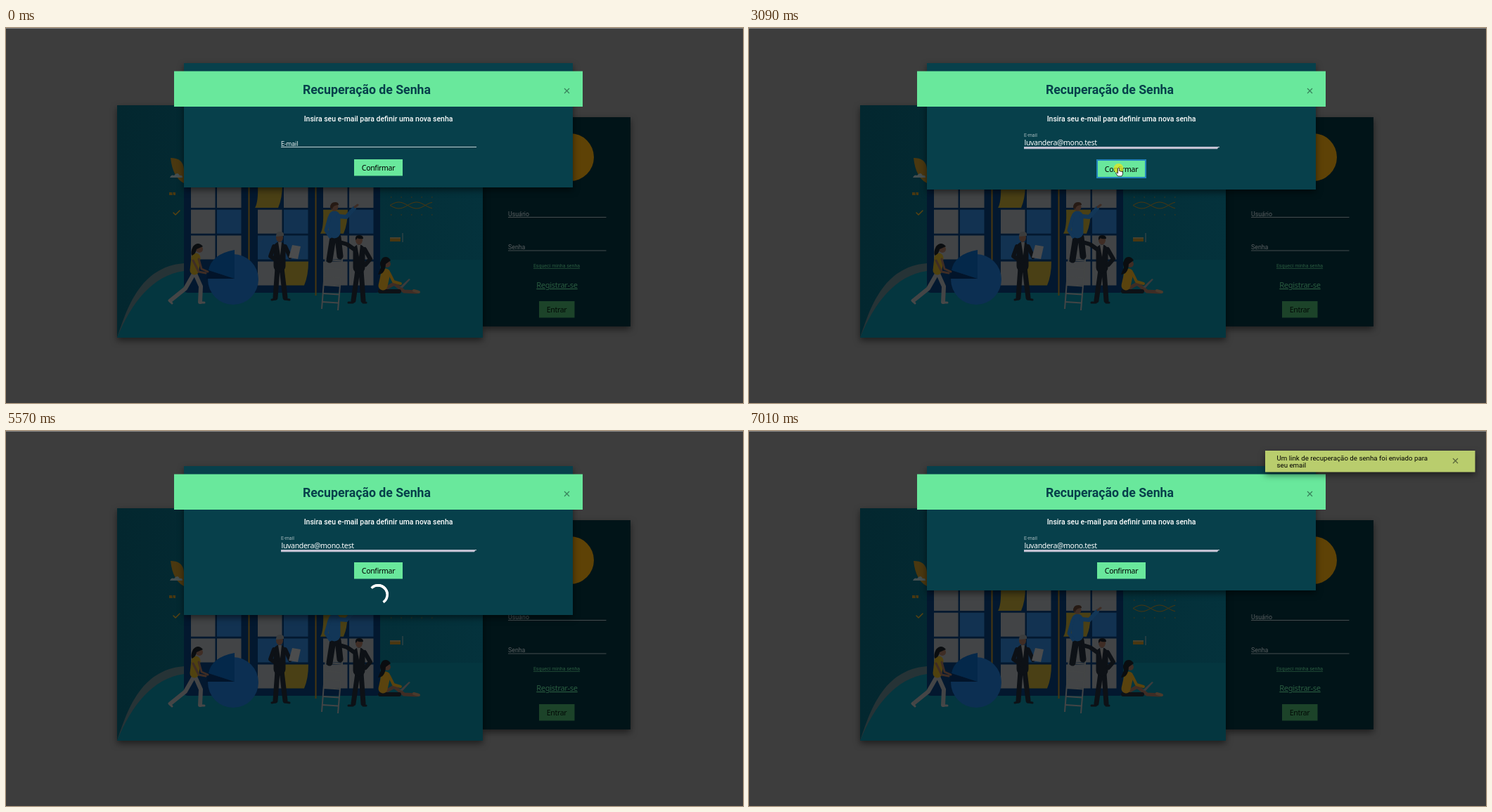
Write an HTML page that moves like this. It is 1048x534 px and loops after 7.31 s.

```html
<!DOCTYPE html>
<html lang="pt">
<head>
<meta charset="utf-8">
<title>Recuperação de Senha</title>
<style>
html, body { margin: 0; width: 100%; height: 100%; overflow: hidden; background: #3d3d3d; }
svg { display: block; width: 100vw; height: 100vh; }
text { font-family: Roboto, Arial, sans-serif; white-space: pre; }
.ui { font-family: "Noto Sans", "Open Sans", sans-serif; font-size: 10.5px; letter-spacing: -.03em; }
.mid { text-anchor: middle; }
.link { text-decoration: underline; fill: #2a5c40; }
.shade { filter: drop-shadow(0 4px 5px rgba(0,0,0,.5)); }
.limb { fill: none; stroke-linecap: round; stroke-linejoin: round; }
.cross { fill: none; stroke-width: 1.2; }
</style>
</head>
<body>
<svg viewBox="0 0 1048 534" preserveAspectRatio="none">
  <defs>
    <linearGradient id="sky">
      <stop offset="0" stop-color="#03272f"/>
      <stop offset="1" stop-color="#04323c"/>
    </linearGradient>
  </defs>
  <rect width="1048" height="534" fill="#3d3d3d"/>
  <rect width="1048" height="1" fill="#858585"/>

  <!-- login form -->
  <rect class="shade" x="677" y="127" width="211" height="298" fill="#011418"/>
  <circle cx="802" cy="184" r="34" fill="#5e4206"/>
  <g fill="#5b6062" font-size="8.8">
    <text x="714" y="267.5">Usuário</text>
    <text x="714" y="315">Senha</text>
    <path d="M714 269.5h139.500M714 317h139.500" stroke="#454c4e"/>
  </g>
  <text class="mid link" x="783" y="341" font-size="7">Esqueci minha senha</text>
  <text class="mid link ui" x="783.500" y="370" style="font-size:11.1px">Registrar-se</text>
  <rect x="758" y="389" width="50.500" height="23.500" fill="#1c4329"/>
  <text class="mid ui" x="783" y="405" fill="#020a06">Entrar</text>

  <!-- illustration -->
  <rect class="shade" x="158" y="110" width="520" height="331" fill="url(#sky)"/>
  <path d="M158 441C172 400 190 340 253 335V350z" fill="#263336"/>
  <path d="M158 441C178 391 209 352 253 346L400 330L678 330V441z" fill="#04363f"/>
  <g fill="#4a3810">
    <path d="M234 185q18 0 19 16v20q-16-8-19-36z"/>
    <path d="M232 234h4l1 4h-5zM237 234h4v4h-3z"/>
  </g>
  <path d="M233 213q2-5 6-3q5-6 8 0q4-1 4 3z" fill="#454f50"/>
  <path class="limb" d="M238 263l3 3l6-6" stroke="#5a4310" stroke-width="1.500"/>
  <rect x="253" y="200" width="279" height="177" rx="5" fill="#03182f"/>
  <g id="cells"></g>
  <path d="M345.500 200V376M440.500 200V381" stroke="#483710" stroke-width="2"/>
  <path id="waves" fill="none" stroke="#4a3710"/>
  <path d="M547 241h60M547 266h60" stroke="#4a3710" stroke-dasharray="1.500 13"/>
  <path d="M546 298h15v6h-15z" fill="#4a3710"/>
  <path d="M546 299h15M564 292v13" stroke="#454b4b"/>

  <!-- chart and the woman pushing it -->
  <circle cx="323" cy="358" r="36" fill="#0c2f52"/>
  <path d="M325 357L288 345Q292 322 325 316z" fill="#04284a"/>
  <path d="M325 357L288 345L285 357z" fill="#02142a"/>
  <g class="limb">
    <path d="M267 350l-12 21l-21 17M269 350l8 18l-1 22" stroke="#444546" stroke-width="6"/>
    <path d="M232 388l4 4M275 391h7" stroke="#484848" stroke-width="3"/>
    <path d="M270 327l-2 18" stroke="#50420f" stroke-width="13"/>
    <path d="M274 329l4 14l9 4M266 331l8 16l10 2" stroke="#3f2d25" stroke-width="3"/>
  </g>
  <circle cx="275" cy="315" r="5" fill="#3f2d25"/>
  <path d="M280 311q-7-8-14 0q-4 8-2 13q6-2 7-9z" fill="#0a0d10"/>

  <!-- man with laptop -->
  <g class="limb" stroke="#0d1116">
    <path d="M386 342l-3 42M392 342l5 42" stroke-width="7"/>
    <path d="M389 313v26" stroke-width="17"/>
    <path d="M381 311l-5 14l12 8M397 311l7 15" stroke-width="6"/>
    <path d="M383 386l-5 1M397 386l6 1" stroke-width="3"/>
  </g>
  <path d="M387 305h5l-2 19z" fill="#464646"/>
  <ellipse cx="389" cy="298" rx="5" ry="7" fill="#3f2d25"/>
  <path d="M384 297q0-8 6-7q6 0 5 6z" fill="#3b3d3e"/>
  <path d="M407 309l12 2l-4 18l-13-2z" fill="#4b4c4d"/>

  <!-- ladder and the man on it -->
  <path d="M456 308L449 400M480 308L472 402" stroke="#434546" stroke-width="2"/>
  <path id="rungs" stroke="#434546" stroke-width="2"/>
  <g class="limb">
    <path d="M465 298l-5 32M472 298l3 27" stroke="#0d1116" stroke-width="9"/>
    <path d="M467 269v22" stroke="#123657" stroke-width="17"/>
    <path d="M473 268l11 1l11-12" stroke="#123657" stroke-width="6"/>
    <path d="M496 255l4-3" stroke="#3f2d25" stroke-width="3"/>
    <path d="M460 270l-5 18l6 9" stroke="#123657" stroke-width="5"/>
  </g>
  <circle cx="467" cy="255" r="5.500" fill="#3f2d25"/>
  <path d="M461 256q0-8 7-8q5 0 5 4q-8 0-9 6z" fill="#261a14"/>

  <!-- man in suit -->
  <g class="limb" stroke="#0d1116">
    <path d="M500 345l-6 43M505 345l3 43" stroke-width="7"/>
    <path d="M502 317v24" stroke-width="17"/>
    <path d="M495 315l-10-7l-10-3M510 315l8 14l-7 8" stroke-width="6"/>
    <path d="M493 391h-6M508 391h4" stroke-width="3"/>
  </g>
  <path d="M499 309h5l-2 17z" fill="#464646"/>
  <ellipse cx="502" cy="302" rx="5" ry="6.500" fill="#3f2d25"/>
  <path d="M497 302q-1-7 5-7q6 0 6 5q-7 1-8-1z" fill="#0a0d10"/>

  <!-- woman sitting -->
  <g class="limb">
    <path d="M536 373l16-9l14 11l18 1" stroke="#3f2d25" stroke-width="5"/>
    <path d="M532 375h27" stroke="#0d1116" stroke-width="6"/>
    <path d="M540 349l-4 18" stroke="#5a430e" stroke-width="13"/>
    <path d="M545 349l6 12l10 3" stroke="#5a430e" stroke-width="4"/>
    <path d="M580 374l7 2" stroke="#4a3a2c" stroke-width="4"/>
  </g>
  <path d="M560 369l13-12l2 1l-11 12z" fill="#3c3c3d"/>
  <circle cx="542" cy="336" r="5" fill="#3f2d25"/>
  <path d="M547 331q-4-7-11-4q-6 6-3 14l-4 10q10 0 11-15z" fill="#0a0d10"/>

  <!-- dialog -->
  <rect id="card" class="shade" x="253" y="50" width="553" height="177" fill="#07404b"/>
  <rect x="239" y="61.500" width="581" height="50.500" fill="#69e89c"/>
  <text class="mid" x="513" y="94" font-size="17.700" font-weight="700" fill="#07404b">Recuperação de Senha</text>
  <path class="cross" d="M794 86l7 7m0-7l-7 7" stroke="#37805a"/>
  <text class="mid" x="529.500" y="132.500" font-size="10.450" font-weight="500" fill="#fff">Insira seu e-mail para definir uma nova senha</text>
  <path d="M391 169.500H669" stroke="#c4d0d3"/>
  <path id="bar" fill="#c3c1d2"/>
  <text id="label" x="391">E-mail</text>
  <text id="typed" class="ui" x="391.500" y="167" fill="#fff"></text>
  <path id="caret" stroke="#fff"/>
  <g id="list">
    <rect x="391" y="169.500" width="279" height="14.500" fill="#fff" stroke="#b5b5b5" stroke-width=".600"/>
    <rect id="pick" x="392" y="170" width="276" height="12.500" fill="#dcdcdc"/>
    <text id="hint" class="ui" x="396" y="179.500" style="font-size:8px"></text>
  </g>
  <rect id="button" y="187" height="23.500" fill="#69e89c"/>
  <text id="confirm" class="mid ui" x="529.500">Confirmar</text>
  <g id="ring" fill="none" stroke="#fff" stroke-width="3.600"></g>

  <g id="toast">
    <rect class="shade" x="734" y="28" width="298.500" height="30.500" fill="#b9cd6d"/>
    <text font-size="9.720"><tspan x="750.500" y="42">Um link de recuperação de senha foi enviado para</tspan><tspan x="750.500" y="52">seu email</tspan></text>
    <path class="cross" d="M1001 39l7 7m0-7l-7 7" stroke="#59663a"/>
  </g>

  <circle id="click" r="7" fill="#e6e620" opacity=".75"/>
  <g id="mouse">
    <path id="arrow" d="M0 0V9.500L2.200 7.500L3.800 11L5.400 10.300L3.900 7H7z" fill="#fff" stroke="#111" stroke-width=".700"/>
    <path id="hand" d="M-1 1Q0-1 1 1V4.500L6 6V9L4.500 12H-1L-4 7.500Q-3 6-1 8z" fill="#fff" stroke="#111" stroke-width=".800"/>
    <path id="beam" d="M-2.500-5H-.500L0-4.500L.500-5H2.500M0-4.500V4.500M-2.500 5H-.500L0 4.500L.500 5H2.500" fill="none" stroke="#d5dbdc" stroke-width=".900"/>
  </g>
</svg>
<script>
const LOOP = 7310, TICK = 77, EMAIL = 'luvandera@mono.test';
const el = {};
document.querySelectorAll('[id]').forEach(e => el[e.id] = e);
const set = (e, attrs) => { for (const k in attrs) e.setAttribute(k, attrs[k]); };
const show = (e, on) => { e.style.display = on ? '' : 'none'; };
const within = (n, a, b) => n >= a && n < b;
const lerp = (a, b, p) => a + (b - a) * p;
const clamp = x => Math.min(1, Math.max(0, x));
const easeOut = x => 1 - (1 - clamp(x)) ** 2;

// cubic-bezier(.5, 0, .5, 1)
function swing(x) {
  let lo = 0, hi = 1;
  for (let i = 0; i < 24; i++) {
    const s = (lo + hi) / 2;
    if (1.5 * s * (1 - s) + s ** 3 < x) lo = s; else hi = s;
  }
  return lo * lo * (3 - 2 * lo);
}

function buildScene() {
  const fills = { g: '#424446', b: '#123251', y: '#4a4015' };
  const cols = [263, 300, 358, 395, 451, 488];
  let cells = '';
  ['ggyggg', 'gbgbyb', 'ggbbgg', '..gygg'].forEach((row, r) => {
    const y = 222 + r * 36.8;
    cols.forEach((x, c) => {
      const kind = row[c];
      if (kind === '.') return;
      const d = kind === 'y' ? `M${x} ${y}h35q0 20-6 34h-33q5-8 4-34z` : `M${x} ${y}h34.500v34h-34.500z`;
      cells += `<path d="${d}" fill="${fills[kind]}"/>`;
    });
  });
  el.cells.innerHTML = cells;

  let waves = '';
  for (const sign of [1, -1]) {
    for (let x = 0; x <= 60; x += 2) {
      waves += `${x ? 'L' : 'M'}${546 + x} ${(252.5 + sign * 4.5 * Math.sin(x / 8)).toFixed(1)}`;
    }
  }
  set(el.waves, { d: waves });

  let rungs = '';
  for (let y = 318; y < 400; y += 12) rungs += `M${456 - (y - 308) * .076} ${y}l23 1.500`;
  set(el.rungs, { d: rungs });

  el.ring.innerHTML = '<path d="M-9.330-9.330A13.200 13.200 0 0 1 9.330-9.330"/>'.repeat(4);
  el.hint.textContent = EMAIL;
}

// Pointer position, or null while it is out of sight.
function pointer(n) {
  if (within(n, 1, 20)) {
    const p = easeOut(n / 10);
    return [lerp(1040, 466, p), lerp(574, 164.5, p)];
  }
  if (within(n, 36, 46)) {
    const p = easeOut((n - 35) / 4);
    return [lerp(466, 525.5, p), lerp(164.5, 199, p)];
  }
  if (within(n, 46, 56)) {
    const p = ((n - 45) / 10) ** 1.2;
    return [lerp(525.5, 925, p), lerp(199, 394, p)];
  }
  if (within(n, 56, 59)) return [[960, 446], [992, 494], [1003, 517]][n - 56];
  return null;
}

function drawPointer(n) {
  const at = pointer(n);
  show(el.mouse, at);
  show(el.click, within(n, 10, 12) || within(n, 39, 42));
  if (!at) return;
  const [x, y] = at;
  const onField = within(x, 391, 669) && within(y, 156, 172);
  const onButton = within(x, 495, 564) && within(y, 187, 211);
  set(el.mouse, { transform: `translate(${x} ${y})` });
  set(el.click, { cx: x, cy: y + (onButton ? 1 : 0) });
  show(el.beam, onField);
  show(el.hand, onButton);
  show(el.arrow, !onField && !onButton);
}

function drawField(n) {
  const p = easeOut((n - 10) / 5), end = 391 + 277 * p;
  show(el.bar, p > 0);
  set(el.bar, { d: `M391 169H${end}l-2 3.200H391z` });
  set(el.label, {
    y: lerp(168.3, 154.6, p), 'font-size': lerp(8.9, 6.9, p), fill: p > 0 ? '#a3b7bb' : '#e8eeef'
  });
  el.typed.textContent = n < 20 ? '' : n < 29 ? EMAIL[0] : EMAIL;
  const x = n < 20 ? 392.5 : n < 29 ? 394.5 : 493.5;
  set(el.caret, { d: `M${x} 156V169` });
  show(el.caret, within(n, 10, 17) || within(n, 20, 24) || within(n, 29, 31));
  show(el.list, within(n, 21, 29));
  show(el.pick, n >= 26);
}

function drawDialog(n, t) {
  const pressed = within(n, 39, 43), busy = within(n, 41, 86), drop = pressed ? 3 : 0;
  set(el.card, { height: (busy ? 212 : 177) + drop });
  set(el.button, pressed
    ? { x: 495, y: 188, width: 69, height: 25, stroke: '#2384bd', 'stroke-width': 2 }
    : { x: 495, y: 187, width: 69, height: 23.5, stroke: 'none' });
  set(el.confirm, { y: pressed ? 204.5 : 203 });
  show(el.ring, busy);
  set(el.ring, { transform: `translate(529 ${233 + drop})` });
  [...el.ring.children].forEach((arc, i) => {
    const phase = (t - 3135 + 150 * i + 1200) % 1200 / 1200;
    set(arc, { transform: `rotate(${360 * swing(phase)})` });
  });
}

function drawToast(n, t) {
  const p = easeOut((t - 6690) / 300);
  show(el.toast, n >= 87);
  set(el.toast, { transform: `translate(0 ${-33 * (1 - p)})`, opacity: p });
}

function frame(now) {
  const n = Math.floor((now % LOOP + 8) / TICK), t = n * TICK;
  drawField(n);
  drawDialog(n, t);
  drawToast(n, t);
  drawPointer(n);
  requestAnimationFrame(frame);
}

buildScene();
const start = performance.now();
const run = now => frame(Math.max(0, now - start));
requestAnimationFrame(function loop(now) {
  const n = Math.floor((Math.max(0, now - start) % LOOP + 8) / TICK), t = n * TICK;
  drawField(n);
  drawDialog(n, t);
  drawToast(n, t);
  drawPointer(n);
  requestAnimationFrame(loop);
});
</script>
</body>
</html>
```
